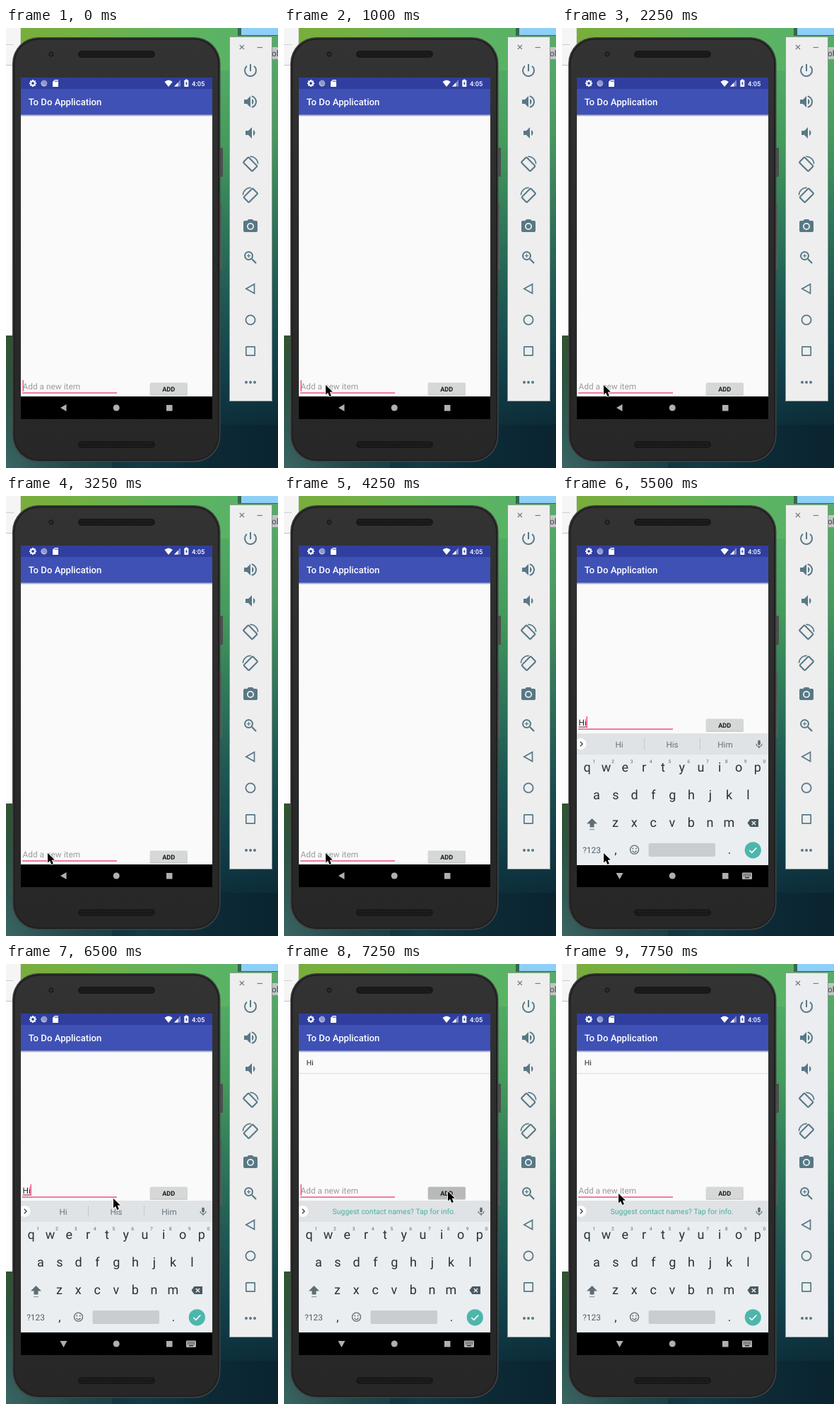
Recreate the animation shown at these times as an HTML page with a canvas. Size 385 by 621 pixels, loop 8000 ms.

```html
<!DOCTYPE html>
<html lang="en">
<head>
<meta charset="utf-8">
<title>To Do Application</title>
<style>
html, body { margin: 0; width: 100%; height: 100%; overflow: hidden; background: #12383d; }
canvas { display: block; width: 385px; height: 621px; }
</style>
</head>
<body>
<canvas id="stage" width="385" height="621"></canvas>
<script>
const ctx = document.getElementById('stage').getContext('2d');
ctx.textRendering = 'geometricPrecision';
const LOOP = 8000;
const FONT = 'Roboto, "Open Sans", sans-serif';
const ICON = '#587886';

// ---------- helpers ----------
function rect(x, y, w, h, fill) {
  ctx.fillStyle = fill;
  ctx.fillRect(x, y, w, h);
}
function rounded(x, y, w, h, r, fill, stroke, lw = 1) {
  ctx.beginPath();
  ctx.roundRect(x, y, w, h, r);
  paint(fill, stroke, lw);
}
function circle(x, y, r, fill, stroke, lw = 1) {
  ctx.beginPath();
  ctx.arc(x, y, r, 0, Math.PI * 2);
  paint(fill, stroke, lw);
}
function arc(x, y, r, from, to, stroke, lw, fill) {
  ctx.beginPath();
  ctx.arc(x, y, r, from * Math.PI, to * Math.PI);
  paint(fill, stroke, lw);
}
function poly(points, fill, stroke, lw = 1, open = false) {
  ctx.beginPath();
  points.forEach(([x, y]) => ctx.lineTo(x, y));
  if (!open) ctx.closePath();
  paint(fill, stroke, lw);
}
function line(x1, y1, x2, y2, stroke, lw = 1) {
  poly([[x1, y1], [x2, y2]], null, stroke, lw, true);
}
function paint(fill, stroke, lw) {
  if (fill) { ctx.fillStyle = fill; ctx.fill(); }
  if (stroke) { ctx.strokeStyle = stroke; ctx.lineWidth = lw; ctx.stroke(); }
}
function text(str, x, y, size, color, align = 'left', weight = 400) {
  ctx.font = `${weight} ${size}px ${FONT}`;
  ctx.textAlign = align;
  ctx.fillStyle = color;
  ctx.fillText(str, x, y);
}
function gradient(x1, y1, x2, y2, colors) {
  const g = ctx.createLinearGradient(x1, y1, x2, y2);
  colors.forEach((c, i) => g.addColorStop(i / (colors.length - 1), c));
  return g;
}
function at(x, y, draw) {
  ctx.save();
  ctx.translate(x, y);
  draw();
  ctx.restore();
}

// ---------- desktop ----------
function drawDesktop() {
  rect(0, 0, 385, 621, gradient(60, 0, 180, 621,
    ['#5cb365', '#52ab64', '#449a5c', '#30795a', '#1f5a54', '#12404a', '#0a2632']));
  rect(0, 0, 330, 60, gradient(0, 0, 300, 0, ['#7aad38', '#74b044', '#65b257', '#5ab364']));
  rect(0, 434, 150, 187, gradient(0, 434, 0, 621, ['#30552f', '#2c5440', '#315a54', '#3b6663']));
  rect(0, 560, 385, 61, gradient(0, 0, 385, 0,
    ['rgba(14,44,54,0)', 'rgba(18,52,58,.6)', '#123c46', '#0c2a36', '#0a2430']));

  rect(0, 0, 10, 434, '#fdfdfd');
  rect(0, 0, 21, 52, '#f5f5f5');
  line(0, 23.5, 11, 23.5, '#cfcfcf');
  line(0, 52.5, 21, 52.5, '#c4c4c4');
  line(20.5, 0, 20.5, 52, '#d8d8d8');

  rect(328, 0, 57, 11, '#35684f');
  rect(333, 0, 52, 10, '#8dcff6');
  rect(375, 27, 10, 17, '#c3c5c5');
  text('ol', 376, 40, 12, '#5d6163', 'left', 500);
}

// ---------- phone ----------
function speaker(y) {
  rounded(102, y, 109, 10, 5, '#181818');
  for (let x = 106; x < 208; x += 3) {
    rect(x, y + 2, 1, 2, '#252525');
    rect(x + 1, y + 6, 1, 2, '#252525');
  }
}
function drawPhone() {
  rounded(302, 169, 5, 41, 1, '#4a504d');
  rounded(301, 249, 4.5, 92, 1, '#56615b');
  rounded(9, 13, 294.5, 599.5, 37, '#424242');
  rounded(10.5, 14.5, 291.5, 596.5, 35.5, '#1f1f1f');
  rounded(12.5, 16.5, 287.5, 592.5, 34, gradient(0, 16, 0, 608, ['#333', '#2b2b2b', '#272727']));
  speaker(32);
  speaker(583);
  circle(64, 37, 4.2, '#1d1d1f', '#343437');
  circle(64, 37, 1.8, '#2c2e38');
}

function drawStatusBar() {
  rect(21, 70, 271, 16, '#303f9f');
  at(38, 78, () => {
    for (let i = 0; i < 8; i++) {
      ctx.rotate(Math.PI / 4);
      rect(-1, -5, 2, 3, '#fff');
    }
    circle(0, 0, 2.9, null, '#fff', 1.9);
  });
  circle(54, 78, 4.4, '#8f99cb');
  arc(54, 78, 3.8, 0.2, 1.2, '#c6cce6', 1.2);
  poly([[69, 73], [74, 73], [74, 83], [66, 83], [66, 76]], '#fff');
  for (const x of [69, 70.8, 72.5]) rect(x, 74, 0.9, 2, '#303f9f');
  ctx.beginPath();
  ctx.moveTo(230, 83);
  ctx.lineTo(224.5, 76);
  ctx.quadraticCurveTo(230, 71, 235.8, 76);
  ctx.closePath();
  paint('#fff');
  poly([[247, 73], [247, 82.5], [238, 82.5]], '#7f89c3');
  poly([[243.5, 77], [243.5, 82.5], [238, 82.5]], '#fff');
  rect(254, 72.5, 2.5, 1.5, '#fff');
  rounded(252.3, 73.5, 6, 9.5, 0.8, '#fff');
  poly([[255.8, 75], [253.8, 78.7], [255, 78.7], [254.8, 81.5], [256.9, 77.7], [255.7, 77.7]], '#303f9f');
  text('4:05', 263, 81.5, 9.3, '#fff', 'left', 500);
}

function drawNav(keyboard, drop) {
  const c = '#b0b0b0';
  rect(21, 520 + drop, 271, 32 - drop, '#000');
  if (keyboard) {
    poly([[76.5, 532], [86.5, 532], [81.5, 541]], c);
    rounded(255, 531.5, 14, 9.5, 1.2, c);
    for (let i = 0; i < 5; i++) {
      rect(257 + i * 2.2, 533.3, 1.1, 1.1, '#000');
      rect(257 + i * 2.2, 535.6, 1.1, 1.1, '#000');
    }
    rect(259, 538.2, 6, 1.1, '#000');
  } else {
    poly([[77, 536], [85.5, 531], [85.5, 541]], c);
  }
  circle(156.2, 536, 4.5, c);
  rect(227, 532, 8.5, 8.5, c);
}

// ---------- form ----------
function drawForm(s) {
  at(0, s.keyboard ? -186 : 0, () => {
    if (s.typed) {
      text('Hi', 23.5, 510, 11.86, '#222');
      rect(23.5, 511.5, 11.5, 1, '#333');
    } else {
      text('Add a new item', 23.5, 510, 11.86, '#9b9b9b');
    }
    rect(23, 514.3, 134, 1.5, '#f0508a');
    if (s.caret) rect(s.typed ? 34.5 : 23.5, 497, 1.4, 16, '#ff4081');
    rounded(203.8, 501.5, 53, 17.2, 1.5, 'rgba(0,0,0,.22)');
    rounded(203.8, 500.5, 53, 17, 1.5, s.button);
    text('ADD', 230.2, 513, 9.2, '#1c1c1c', 'center', 600);
  });
}

// ---------- keyboard ----------
function keyRow(keys, x, step, y) {
  [...keys].forEach((k, i) => text(k, x + i * step, y, 18, '#263238', 'center'));
}
function drawKeyboard(s) {
  const grey = '#5f6d74';
  ctx.save();
  ctx.beginPath();
  ctx.rect(21, 334, 271, 187);
  ctx.clip();
  ctx.translate(0, s.drop);
  rect(21, 334, 271, 188, '#eaeef1');
  rect(21, 334, 271, 30, '#e0e3e5');

  circle(26.5, 349, 8, '#fbfcfc');
  poly([[25.8, 345.8], [29, 349], [25.8, 352.2]], null, '#37474f', 1.4, true);
  if (s.added) {
    text('Suggest contact names? Tap for info.', 155.7, 353, 10.5, '#45b0a4', 'center');
  } else {
    ['Hi', 'His', 'Him'].forEach((w, i) => text(w, 81 + i * 75, 353.6, 11.7, '#66737a', 'center'));
    rect(116, 341, 1, 16, '#c3c9cc');
    rect(195, 341, 1, 16, '#c3c9cc');
  }
  rounded(277.2, 343.5, 3.6, 7.2, 1.8, grey);
  arc(279, 348.8, 4, 0, 1, grey, 1.2);
  line(279, 352.5, 279, 355, grey, 1.3);

  keyRow('qwertyuiop', 35.7, 26.8, 388);
  [...'1234567890'].forEach((d, i) =>
    text(d, 45.2 + i * 26.8, 375.5, 6.8, '#77848a', 'center', 500));
  keyRow('asdfghjkl', 49, 26.8, 427);
  keyRow('zxcvbnm', 75.5, 26.8, 466);

  poly([[42.5, 454], [50, 461.5], [45.5, 461.5], [45.5, 466.5], [39.5, 466.5], [39.5, 461.5], [35, 461.5]], grey);
  rect(39, 469, 7, 1.2, '#8a969b');
  poly([[262.5, 460.5], [266.5, 455], [278, 455], [278, 466], [266.5, 466]], '#4a5960');
  line(268.8, 458, 274, 463.2, '#eef1f3', 1.4);
  line(274, 458, 268.8, 463.2, '#eef1f3', 1.4);

  text('?123', 42, 502.5, 11.9, '#4f5e66', 'center');
  text(',', 76, 504, 17, '#263238', 'center');
  circle(102.5, 498.2, 6, null, grey, 1.3);
  circle(100.3, 496.5, 0.9, grey);
  circle(104.7, 496.5, 0.9, grey);
  arc(102.5, 498.6, 3, 0.1, 0.9, grey, 1.2);
  rounded(122.5, 489, 94.5, 19, 2, '#c9cdcf');
  text('.', 237, 504, 17, '#263238', 'center');
  circle(270.3, 498.8, 11.6, '#4db6ac');
  poly([[265.3, 499], [268.7, 502.3], [275.3, 495.5]], null, '#fff', 1.6, true);
  ctx.restore();
}

// ---------- emulator controls ----------
function rotateIcon(y, flip) {
  at(346, y, () => {
    ctx.scale(flip, 1);
    arc(0, 0, 10.6, 1.48, 1.99, ICON, 1.6);
    ctx.rotate(Math.PI / 4);
    rounded(-9, -4.8, 18, 10.4, 1.2, null, ICON, 2.1);
  });
}
function speakerIcon(x, y) {
  poly([[x, y - 3], [x + 4, y - 3], [x + 9, y - 8], [x + 9, y + 8], [x + 4, y + 3], [x, y + 3]], ICON);
  arc(x + 9, y, 4.5, -0.35, 0.35, null, 0, ICON);
}
function drawControls(panel) {
  rect(316, 12, 61, 515, '#8e9794');
  rect(317, 13, 59, 513, panel);
  line(330.8, 24, 337, 30, '#777d80', 1.2);
  line(337, 24, 330.8, 30, '#777d80', 1.2);
  line(355.5, 27.5, 363, 27.5, '#777d80', 1.2);

  arc(346, 60, 8, -0.28, 1.28, ICON, 2);
  line(346, 51, 346, 61, ICON, 2);
  speakerIcon(337, 104);
  arc(346, 104, 8, -0.43, 0.43, ICON, 2);
  speakerIcon(339, 148);
  rotateIcon(192, 1);
  rotateIcon(236, -1);

  rounded(336, 272, 20, 16, 2, ICON);
  poly([[341, 272.5], [343, 270], [349, 270], [351, 272.5]], ICON);
  circle(346, 280, 5, panel);
  circle(346, 280, 3.2, ICON);

  circle(343.5, 321.5, 5.5, null, ICON, 2);
  line(348, 326, 354, 332, ICON, 2.3);
  line(340.8, 321.5, 346.2, 321.5, ICON, 1.2);
  line(343.5, 318.8, 343.5, 324.2, ICON, 1.2);

  poly([[339.8, 368], [351.5, 361.5], [351.5, 374.5]], null, ICON, 1.7);
  circle(346, 412, 6.6, null, ICON, 1.8);
  rounded(339.8, 449.8, 12.4, 12.4, 0.5, null, ICON, 1.7);
  for (const x of [340, 346, 352]) circle(x, 500, 2, ICON);
}

// ---------- pointer ----------
const POINTER = [[0, 0], [0, 13.5], [3.1, 10.7], [5.3, 16], [7.9, 15], [5.7, 9.8], [9.8, 9.6]];
// time, x, y of each place where the pointer rests
const STOPS = [
  [250, 164, 423], [500, 95, 486], [750, 65, 520], [1000, 59, 504],
  [6500, 152, 331], [6750, 232, 299], [7000, 232, 321], [7750, 80, 324]
];
function drawPointer(t) {
  const stop = STOPS.filter(s => s[0] <= t).pop();
  if (!stop) return;
  at(stop[1], stop[2], () => {
    ctx.lineJoin = 'round';
    poly(POINTER, '#000', '#fff', 1.6);
    poly(POINTER, '#000');
  });
}

// ---------- timeline ----------
function stateAt(t) {
  const keyboard = t >= 5500;
  const added = t >= 7250;
  return {
    keyboard,
    added,
    typed: keyboard && !added,
    drop: keyboard && t < 5750 ? 1 : 0,
    caret: keyboard ? t < 6000 || (t >= 6500 && t < 7750) : (t + 250) % 1000 < 500,
    button: t < 7250 || t >= 7750 ? '#d6d7d7' : t < 7500 ? '#b8b9b9' : '#c6c7c7',
    panel: t < 7500 ? '#eeeeef' : '#ebedf0'
  };
}

function draw(t) {
  const s = stateAt(t);
  drawDesktop();
  drawPhone();
  rect(21, 70, 271, 482, '#fafafa');
  drawStatusBar();
  rect(21, 86, 271, 36, '#3f51b5');
  rect(21, 122, 271, 3, gradient(0, 122, 0, 125, ['rgba(50,65,150,.75)', 'rgba(50,65,150,0)']));
  text('To Do Application', 31.8, 109, 13.2, '#fff', 'left', 500);
  if (s.added) {
    text('Hi', 31.8, 142.7, 10.5, '#222');
    rect(21, 154, 271, 1, '#dedede');
  }
  drawForm(s);
  if (s.keyboard) drawKeyboard(s);
  drawNav(s.keyboard, s.drop);
  drawControls(s.panel);
  drawPointer(t);
}

const start = performance.now();
function tick() {
  draw((performance.now() - start) % LOOP);
  requestAnimationFrame(tick);
}
tick();
</script>
</body>
</html>
```
